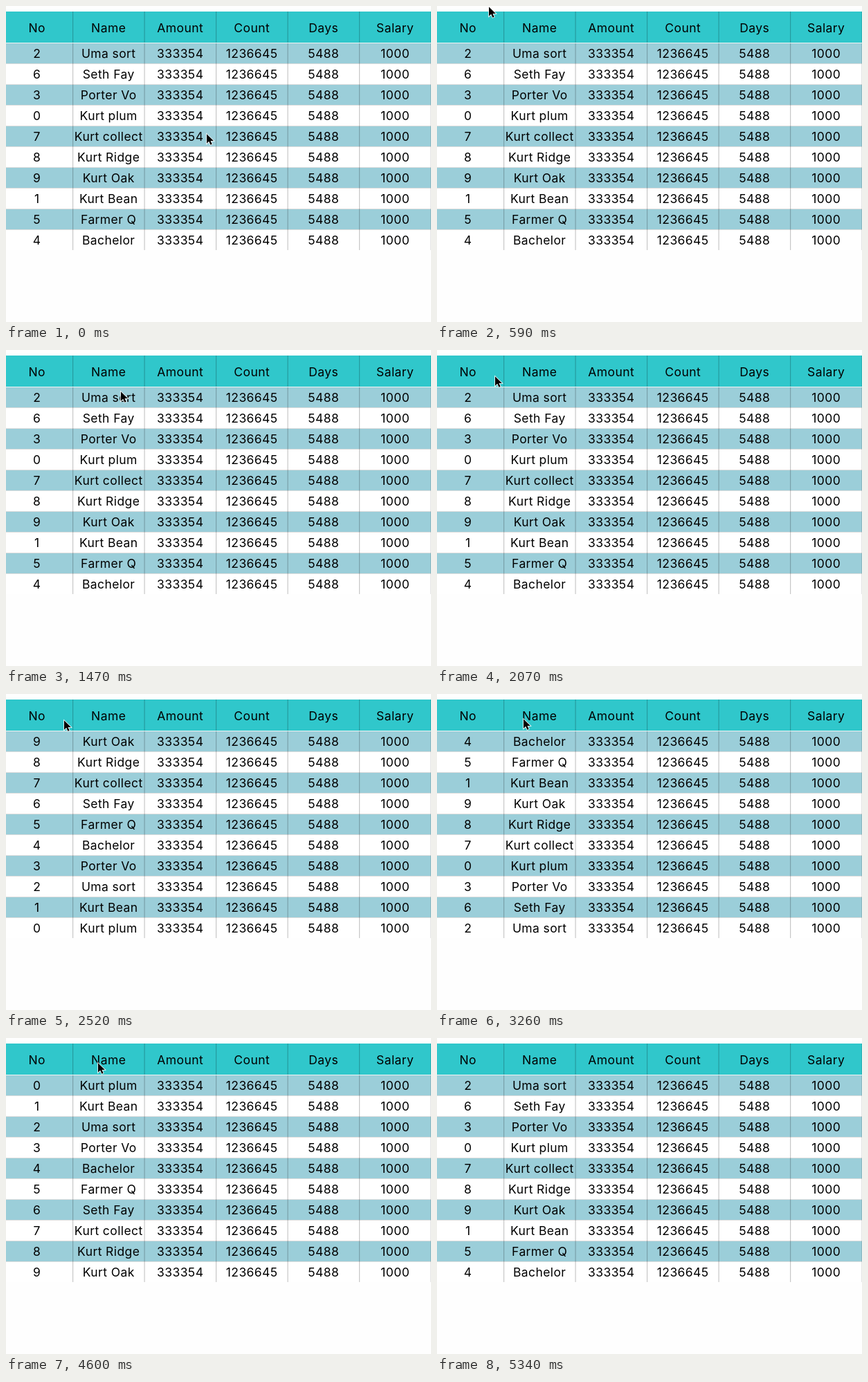
An HTML page for the animation above (5790 ms loop, 614 px wide and 457 px high).

```html
<!DOCTYPE html>
<html lang="en">
<head>
<meta charset="utf-8">
<title>Sortable table</title>
<style>
  html, body { margin: 0; width: 100%; height: 100%; overflow: hidden; background: #fefefe; }
  svg { display: block; width: 614px; height: 457px; }
  text { font: 17.5px Inter, "Liberation Sans", sans-serif; letter-spacing: .4px; text-anchor: middle; fill: #000; }
</style>
</head>
<body>
<svg id="stage" viewBox="0 0 614 457"></svg>
<script>
const stage = document.getElementById('stage');
const LOOP = 5790, COL = 103.5, ROW = 30, TOP = 54;
const heads = ['No', 'Name', 'Amount', 'Count', 'Days', 'Salary'];
const names = ['Kurt plum', 'Kurt Bean', 'Uma sort', 'Porter Vo', 'Bachelor',
  'Farmer Q', 'Seth Fay', 'Kurt collect', 'Kurt Ridge', 'Kurt Oak'];
const fixed = ['333354', '1236645', '5488', '1000'];

const ids = names.map((_, i) => i);
const nameUp = [...ids].sort((a, b) => names[a] < names[b] ? -1 : 1);
const orders = {
  plain: ids,
  noDown: [...ids].reverse(),
  nameUp,
  nameDown: [...nameUp].reverse()
};

// start time, pointer x, pointer y, row order
const steps = [
  [0, 289, 184, 'nameDown'],
  [140, 262, 142, 'nameDown'],
  [290, 205, 72, 'nameDown'],
  [430, 132, 18, 'nameDown'],
  [580, 74, 0, 'nameDown'],
  [730, 52, 18, 'nameDown'],
  [880, 52, 28, 'noDown'],
  [1030, 92, 38, 'noDown'],
  [1180, 146, 42, 'noDown'],
  [1330, 162, 46, 'nameDown'],
  [1470, 165, 59, 'nameDown'],
  [1620, 152, 60, 'nameDown'],
  [1770, 122, 51, 'nameDown'],
  [1920, 95, 41, 'nameDown'],
  [2070, 83, 37, 'nameDown'],
  [2520, 83, 37, 'noDown'],
  [2970, 108, 36, 'noDown'],
  [3120, 124, 35, 'nameDown'],
  [3260, 124, 35, 'nameUp'],
  [3560, 128, 35, 'nameUp'],
  [3710, 132, 35, 'nameUp'],
  [3850, 132, 35, 'plain'],
  [4300, 132, 35, 'nameDown'],
  [4450, 132, 35, 'nameUp'],
  [4600, 132, 35, 'plain'],
  [4750, 132, 35, 'nameDown'],
  [4900, 186, 86, 'nameDown'],
  [5040, 352, 256, 'nameDown'],
  [5190, 485, 396, 'nameDown'],
  [5340, -50, -50, 'nameDown']
];

function add(tag, attrs, content = '') {
  const el = document.createElementNS('http://www.w3.org/2000/svg', tag);
  for (const key in attrs) el.setAttribute(key, attrs[key]);
  el.textContent = content;
  return stage.appendChild(el);
}
const rect = (x, y, width, height, fill) => add('rect', { x, y, width, height, fill });
const label = (col, y, content) => add('text', { x: 44.7 + col * COL, y }, content);

rect(0, 8, 614, 45, '#30c7cb');
rect(0, TOP, 614, 299, '#ddd');
const cells = ids.map(i => {
  const y = TOP + i * ROW;
  rect(0, y, 614, 29, i % 2 ? '#fff' : '#9bced9');
  return y;
});
heads.forEach((_, i) => rect(96 + i * COL, 8, 1.2, 345, 'rgba(0,0,0,.22)'));
rect(0, 53, 614, 1, '#eef3f3');

heads.forEach((head, i) => label(i, 37.6, head));
const rows = cells.map(y => {
  fixed.forEach((value, i) => label(i + 2, y + 21, value));
  return [label(0, y + 21), label(1, y + 21)];
});
const pointer = add('path', {
  d: 'M1 1.3V14.8l3.2-3 2.2 4.9 2.3-1-2.2-4.8h4.4z',
  fill: '#000', stroke: '#fff', 'stroke-width': 1.6, 'paint-order': 'stroke'
});

let shown;
function draw(now) {
  const time = now % LOOP;
  const step = steps.findLast(s => s[0] <= time);
  if (step !== shown) {
    const [, x, y, order] = shown = step;
    pointer.setAttribute('transform', `translate(${x} ${y})`);
    rows.forEach(([no, name], i) => {
      const id = orders[order][i];
      no.textContent = id;
      name.textContent = names[id];
    });
  }
}
const start = performance.now();
function tick() {
  draw(Math.max(0, performance.now() - start));
  requestAnimationFrame(tick);
}
tick();
</script>
</body>
</html>
```
